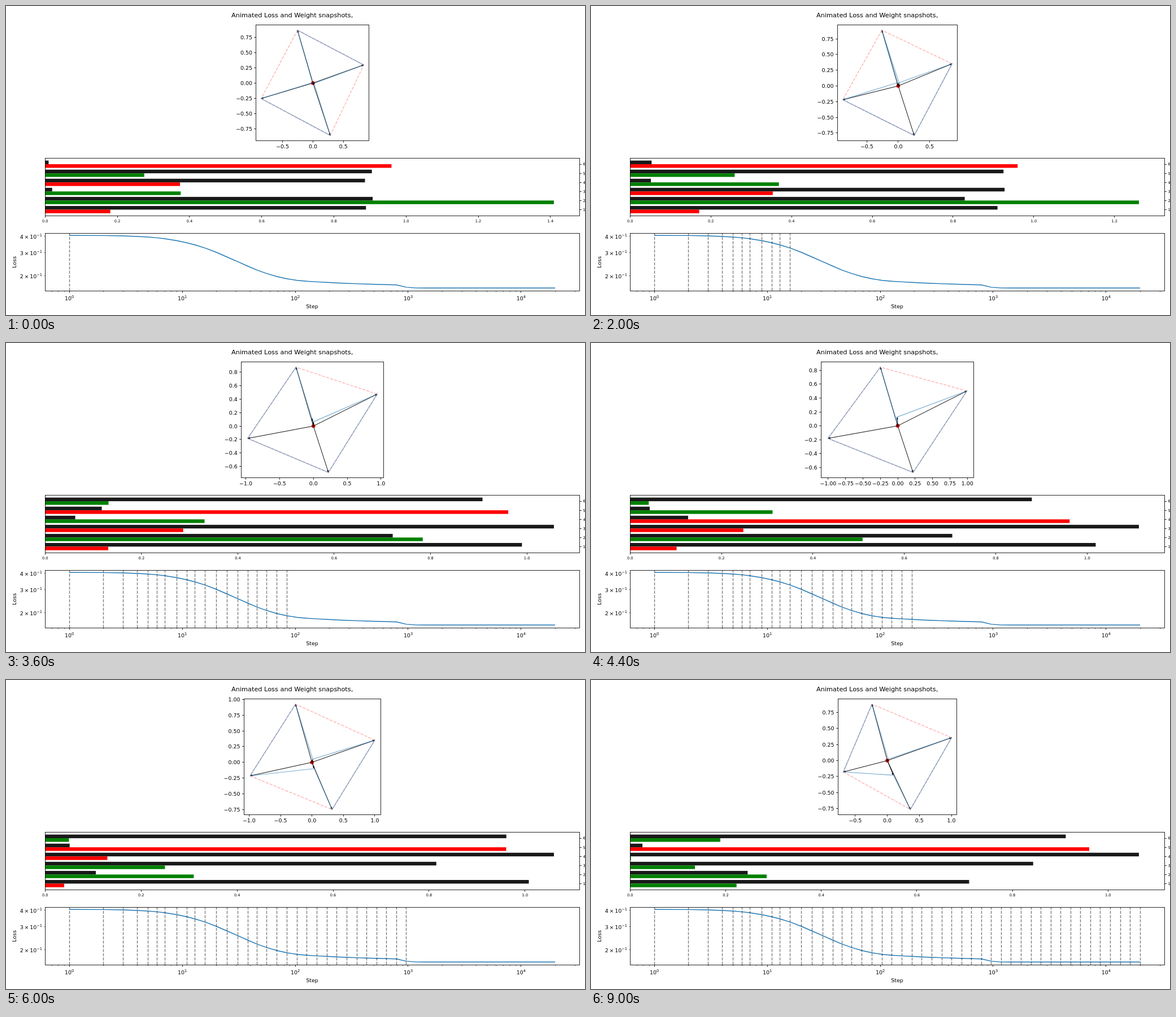
Animation of 1025x547 px, one loop 9200 ms. Source, as an HTML page:

```html
<!DOCTYPE html>
<html lang="en">
<head>
<meta charset="utf-8">
<title>Loss and weight snapshots</title>
<style>
  html, body { margin: 0; width: 100%; height: 100%; overflow: hidden; background: #fff; }
  svg { display: block; }
  text { font-family: "DejaVu Sans", Verdana, sans-serif; white-space: pre; }
</style>
</head>
<body>
<svg id="stage" width="1025" height="547" viewBox="0 0 1025 547">
  <g id="fixed"></g>
  <g id="moving"></g>
</svg>
<script>
const PT = 0.943;              // pixels per point
const FRAME_MS = 200, FRAMES = 46;
const FONT = 10 * PT, SMALL = 7 * PT, TICK = 3.5 * PT, LINE = 1.5 * PT;
const DASH = `${3.7 * LINE} ${1.6 * LINE}`;

// Each neuron: weight (x, y) and bias b at the key frames.
const KEYS = [0, 6, 14, 22, 25, 30, 34, 42];
const JUMP = 5;                // the segment that settles abruptly
const NEURONS = [
  { x: [-.852, -.857, -.925, -1.003, -1, -.985, -.69, -.687],
    y: [-.255, -.25, -.19, -.18, -.207, -.215, -.18, -.178],
    b: [-.181, -.18, -.155, -.102, -.079, -.04, .22, .223] },
  { x: [.285, .28, .228, .22, .265, .32, .36, .36],
    y: [-.862, -.847, -.722, -.67, -.722, -.75, -.763, -.763],
    b: [1.41, 1.378, 1.062, .509, .395, .25, .14, .136] },
  { x: [.835, .841, .888, .994, 1.002, 1, 1.002, 1.003],
    y: [.298, .306, .42, .502, .467, .353, .357, .358],
    b: [-.374, -.37, -.326, -.248, -.232, -.13, .002, .002] },
  { x: [-.255, -.256, -.265, -.25, -.25, -.262, -.24, -.239],
    y: [.869, .874, .899, .843, .879, .925, .887, .88],
    b: [.275, .272, .232, .041, .035, .05, .18, .189] },
  { x: [-.008, -.01, -.028, -.008, .01, .012, .014, .014],
    y: [.006, .014, .093, .127, .104, .05, .022, .022],
    b: [-.96, -.96, -.961, -.962, -.961, -.961, -.96, -.961] },
  { x: [.019, .01, .012, -.01, 0, .035, .09, .093],
    y: [-.006, .02, .071, .042, -.031, -.1, -.22, -.228],
    b: [.376, .375, .357, .312, .32, .31, .289, .286] }
];

// Pixel heights of the loss curve at successive steps; flat afterwards.
const LOSS_Y = [406, 406.4, 407, 408, 409, 410.4, 412, 415.5, 419.2, 423, 428.6, 436,
  444.5, 452.7, 460.5, 467.6, 473.6, 479, 483, 485.7, 487.3, 488.4, 489.3, 490.2, 491,
  491.6, 492.2, 492.8, 493.3, 493.8, 497.9, 499.1, 499.3];

const STEPS = [...new Set(Array.from({ length: 50 },
  (_, i) => Math.floor(20000 ** (i / 49) + 1e-6)))];

const snap = v => Math.floor(v) + 0.5;
const stepX = s => 112.2 + 199.93 * Math.log10(s);
const lossTickY = v => 407.8 - 232.5 * Math.log10(v / 0.4);
const line = (x1, y1, x2, y2, attrs) =>
  `<line x1="${x1}" y1="${y1}" x2="${x2}" y2="${y2}" ${attrs}/>`;
const text = (x, y, s, size = FONT, anchor = "middle", attrs = "") =>
  `<text x="${x}" y="${y}" font-size="${size}" text-anchor="${anchor}" ${attrs}>${s}</text>`;
const rect = (x, y, w, h, attrs) =>
  `<rect x="${x}" y="${y}" width="${w}" height="${h}" ${attrs}/>`;
const path = (points, attrs) => `<path d="M${points.map(p => p.join(" ")).join("L")}" ${attrs}/>`;
const box = (l, t, r, b) => rect(l, t, r - l, b - t, 'fill="none" stroke="#000" stroke-width=".85"');
const tick = (x, y, dx, dy, w = 0.85) => line(x, y, x + dx, y + dy, `stroke="#000" stroke-width="${w}"`);
const power = (e, lead = "") =>
  `${lead}10<tspan font-size="${FONT * 0.7}" dy="-3.6">${String(e).replace("-", "\u2212")}</tspan>`;
const number = (v, digits) => (Math.abs(v) < 1e-9 ? 0 : v).toFixed(digits).replace("-", "\u2212");

function valueAt(track, frame) {
  let i = 0;
  while (i < KEYS.length - 2 && frame >= KEYS[i + 1]) i++;
  const span = KEYS[i + 1] - KEYS[i], u = Math.min(1, (frame - KEYS[i]) / span);
  const from = track[i], to = track[i + 1];
  if (i === JUMP) return from + (to - from) * (1 - 0.27 ** (u * span)) / (1 - 0.27 ** span);
  const secant = k => (track[k + 1] - track[k]) / (KEYS[k + 1] - KEYS[k]);
  const slope = k => {
    if (k === 0 || k === KEYS.length - 1) return 0;
    const a = secant(k - 1), b = secant(k);
    return a * b <= 0 ? 0 : 2 * a * b / (a + b);
  };
  const v = 1 - u;
  return from * v * v * (1 + 2 * u) + to * u * u * (3 - 2 * u)
    + span * u * v * (slope(i) * v - slope(i + 1) * u);
}

function tickStep(range, bins) {
  return [0.1, 0.2, 0.25, 0.5, 1].find(s => s >= range / bins);
}

function ticksBetween(lo, hi, step) {
  const out = [];
  for (let k = Math.ceil(lo / step - 1e-9); k * step <= hi + 1e-9; k++) out.push(k * step);
  return out;
}

function limits(values) {
  const lo = Math.min(...values), hi = Math.max(...values), pad = 0.05 * (hi - lo);
  return [lo - pad, hi + pad];
}

function arrow([x0, y0], [x1, y1]) {
  const len = Math.hypot(x1 - x0, y1 - y0) || 1;
  const ux = (x1 - x0) / len, uy = (y1 - y0) / len, h = 4, w = 1.6;
  const bx = x1 - ux * h, by = y1 - uy * h;
  return line(x0, y0, x1, y1, 'stroke="#000" stroke-width=".95"')
    + path([[x1, y1], [bx - uy * w, by + ux * w], [bx + uy * w, by - ux * w]], 'fill="#000"');
}

function drawWeights(neurons) {
  const top = 33.5, bottom = 238.5, mid = 542.5;
  const [xLo, xHi] = limits(neurons.map(n => n.x));
  const [yLo, yHi] = limits(neurons.map(n => n.y));
  const scale = (bottom - top) / (yHi - yLo), width = (xHi - xLo) * scale;
  const left = mid - width / 2, right = mid + width / 2;
  const px = x => left + (x - xLo) * scale, py = y => bottom - (y - yLo) * scale;
  const origin = [px(0), py(0)], points = neurons.map(n => [px(n.x), py(n.y)]);
  const hull = points.filter((_, i) => neurons[i].norm > 0.5);

  let out = `<circle cx="${origin[0]}" cy="${origin[1]}" r="3.3" fill="red"/>`;
  out += points.map(p => arrow(origin, p)).join("");
  hull.forEach((p, i) => out += path([p, hull[(i + 1) % hull.length]],
    `fill="none" stroke="red" stroke-opacity=".3" stroke-width="${LINE}" stroke-dasharray="${DASH}"`));
  out += path([...points, points[0]],
    `fill="none" stroke="#1f77b4" stroke-opacity=".5" stroke-width="${LINE}" stroke-linejoin="round"`);
  out += box(snap(left), top, snap(right), bottom);

  const xStep = tickStep(xHi - xLo, Math.min(9, Math.floor(width / (30 * PT))));
  for (const v of ticksBetween(xLo, xHi, xStep))
    out += tick(snap(px(v)), bottom, 0, TICK) + text(px(v), 252.2, number(v, xStep === 0.25 ? 2 : 1));
  const yStep = tickStep(yHi - yLo, 9);
  for (const v of ticksBetween(yLo, yHi, yStep))
    out += tick(snap(left), snap(py(v)), -TICK, 0)
      + text(left - 2 * TICK, py(v) + 3.5, number(v, yStep === 0.25 ? 2 : 1), FONT, "end");
  return out;
}

function drawBars(neurons) {
  const left = 69, unit = 16.07, rowY = v => 371.5 - (v - 0.31) * unit;
  const longest = Math.max(...neurons.flatMap(n => [n.norm, Math.abs(n.b)]));
  const scale = 946 / (1.05 * longest), h = 0.4 * unit;
  let out = "";
  neurons.forEach((n, i) => {
    const y = rowY(i + 1);
    out += rect(left, y - h, n.norm * scale, h, 'fill="#000" fill-opacity=".9"')
      + rect(left, y, Math.abs(n.b) * scale, h, `fill="${n.b < 0 ? "red" : "green"}"`);
  });
  for (const v of ticksBetween(0, 1.05 * longest, 0.2)) {
    const x = left + 0.3 + v * scale;
    out += tick(snap(x), 371.5, 0, TICK) + text(x, 383, number(v, 1), SMALL);
  }
  return out + box(69.5, 269.5, 1015.5, 371.5);
}

function drawMarkers(frame) {
  return STEPS.slice(0, frame + 1).map(s => {
    const x = snap(stepX(s));
    return line(x, 504, x, 402,
      `stroke="#000" stroke-opacity=".5" stroke-width="${LINE}" stroke-dasharray="${DASH}"`);
  }).join("") + box(69.5, 402.5, 1015.5, 504.5);
}

function drawFixed() {
  let out = text(399, 20.4, "Animated Loss and Weight snapshots,", 12 * PT, "start");
  for (let row = 1; row <= 6; row++) {
    const y = 371.5 - (row - 0.31) * 16.07;
    out += tick(1015.5, snap(y), TICK, 0) + text(1021.6, y + 2.4, row, SMALL, "start");
  }
  out += path(STEPS.map((s, i) => [stepX(s), LOSS_Y[Math.min(i, LOSS_Y.length - 1)]]),
    `fill="none" stroke="#1f77b4" stroke-width="${LINE}" stroke-linejoin="round"`);
  for (let e = -1; e <= 4; e++) {
    if (e >= 0) out += tick(snap(stepX(10 ** e)), 504.5, 0, TICK)
      + text(stepX(10 ** e), 520.5, power(e));
    for (let m = 2; m <= 9; m++) {
      const x = stepX(m * 10 ** e);
      if (x > 69 && x < 1015) out += tick(snap(x), 504.5, 0, 2 * PT, 0.6);
    }
  }
  for (const m of [2, 3, 4]) {
    const y = lossTickY(m / 10);
    const lead = `${m}<tspan dx="1.8">×</tspan><tspan dx="1.8">1</tspan>0`;
    out += tick(69.5, snap(y), -2 * PT, 0, 0.6)
      + text(64, y + 4, power(-1, lead).replace("010<", "0<"), FONT, "end");
  }
  return out + text(542, 535, "Step")
    + text(0, 0, "Loss", FONT, "middle", 'transform="translate(18.3 453.3) rotate(-90)"');
}

function drawMoving(frame) {
  const neurons = NEURONS.map(n => {
    const x = valueAt(n.x, frame), y = valueAt(n.y, frame);
    return { x, y, b: valueAt(n.b, frame), norm: Math.hypot(x, y), angle: Math.atan2(y, x) };
  }).sort((p, q) => p.angle - q.angle);
  return drawWeights(neurons) + drawBars(neurons) + drawMarkers(frame);
}

const moving = document.getElementById("moving");
document.getElementById("fixed").innerHTML = drawFixed();
const start = performance.now();
let shown = -1;

function render() {
  const elapsed = Math.max(0, performance.now() - start);
  const frame = Math.floor(elapsed / FRAME_MS) % FRAMES;
  if (frame !== shown) moving.innerHTML = drawMoving(shown = frame);
  requestAnimationFrame(render);
}
render();
</script>
</body>
</html>
```
